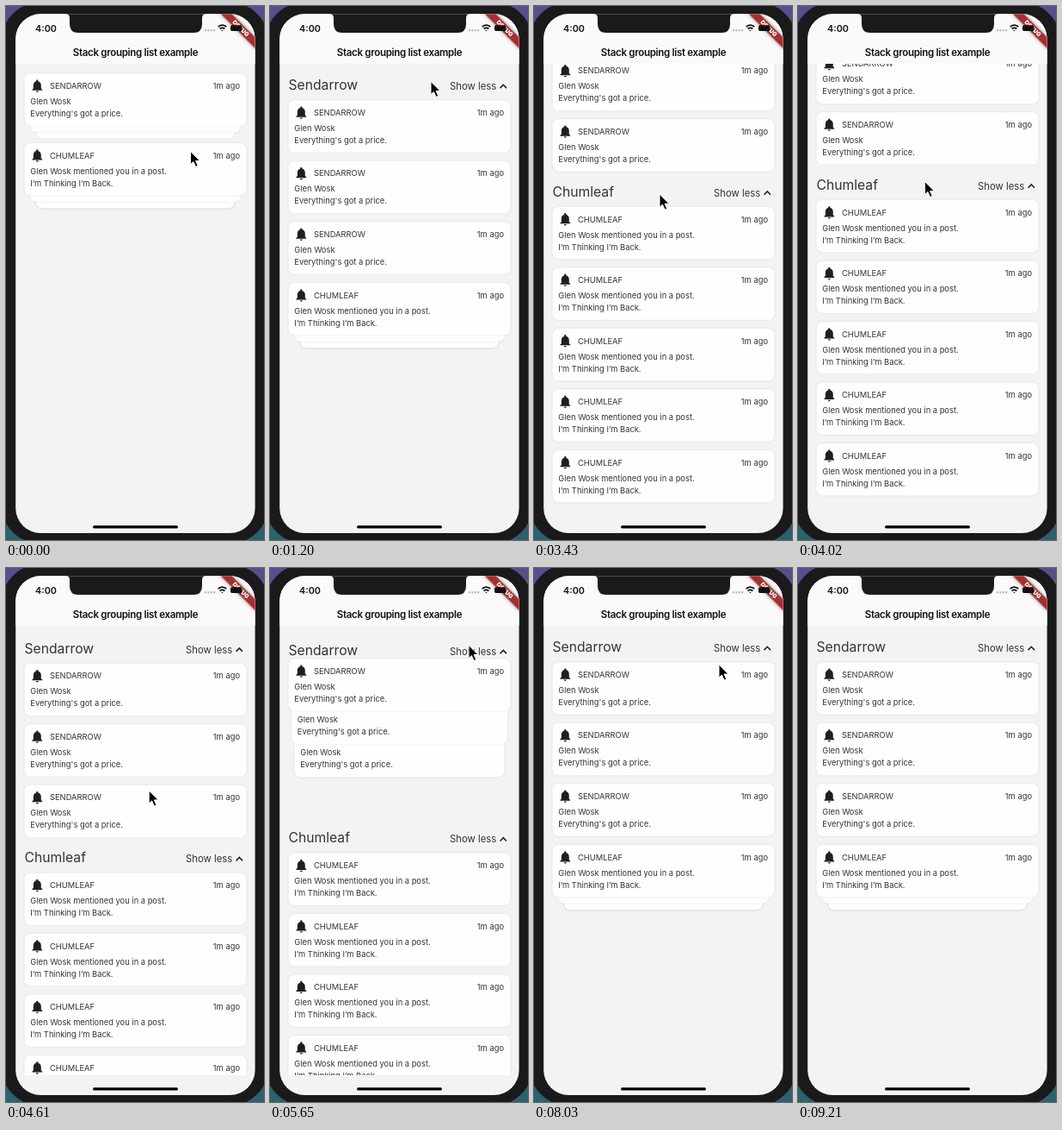
Write an HTML page that moves like this. It is 300 by 619 pixels and loops after 9.31 s.

```html
<!DOCTYPE html>
<html lang="en">
<head>
<meta charset="utf-8">
<title>Stack grouping list example</title>
<style>
  html, body { margin: 0; width: 100%; height: 100%; overflow: hidden; background: #1a1a1a; }
  svg { display: block; width: 100%; height: 100%; }
  text { font: 9.35px Inter, sans-serif; fill: #333; white-space: pre; }
  .heading { font-size: 15.7px; }
  .less { font-size: 11.3px; }
  .title { font-size: 11.5px; font-weight: 600; letter-spacing: -.3px; fill: #111; }
  .clock { font-size: 10.8px; font-weight: 600; fill: #111; }
  .debug { font-size: 6.8px; font-weight: 900; fill: #fff; }
  .end { text-anchor: end; }
  .mid { text-anchor: middle; }
  .card rect { fill: #fefefe; filter: drop-shadow(0 .7px .8px rgba(0, 0, 0, .1)); }
  .ribbon { fill: #a5302f; filter: drop-shadow(0 0 2px rgba(0, 0, 0, .4)); }
  .chevron { fill: none; stroke: #222; stroke-width: 1.6; }
</style>
</head>
<body>
<svg viewBox="0 0 300 619" preserveAspectRatio="none">
  <defs>
    <linearGradient id="desk" x2="0" y2="1">
      <stop stop-color="#5c4d8c"/><stop offset="1" stop-color="#2a626e"/>
    </linearGradient>
    <clipPath id="screen"><rect x="11.2" y="9.2" width="278.4" height="601.8" rx="29"/></clipPath>
    <clipPath id="viewport"><rect x="11" y="67" width="279" height="521"/></clipPath>
    <path id="bell" fill="#1f1f1f" transform="scale(.743)" d="M12 22c1.1 0 2-.9 2-2h-4c0 1.1.89 2 2 2zm6-6v-5c0-3.07-1.64-5.64-4.5-6.32V4c0-.83-.67-1.5-1.5-1.5s-1.5.67-1.5 1.5v.68C7.63 5.36 6 7.92 6 11v5l-2 2v1h16v-1l-2-2z"/>
  </defs>

  <rect width="300" height="619" fill="url(#desk)"/>
  <rect x="-5" y="-4" width="310" height="627" rx="44" fill="#1a1a1a"/>

  <g clip-path="url(#screen)">
    <rect width="300" height="619" fill="#f3f3f3"/>
    <rect width="300" height="67" fill="#fafafa"/>
    <g clip-path="url(#viewport)"><g id="list"></g></g>
    <text class="title mid" x="150.5" y="57.5">Stack grouping list example</text>
    <g transform="translate(290 9) rotate(45)">
      <rect class="ribbon" x="-29.7" y="19.6" width="59.4" height="8.9"/>
      <text class="debug mid" y="26.2">DEBUG</text>
    </g>
    <path fill="#1a1a1a" d="M69 8V9q5 0 5 5v7q0 10 10 10H218q10 0 10-10V14q0-5 5-5V8z"/>
    <text class="clock" x="34" y="29.8">4:00</text>
    <path d="M232 28.3h11" stroke="#bbb" stroke-width="2.4" stroke-linecap="round" stroke-dasharray="0 3.4"/>
    <g fill="none" stroke="#111" stroke-width="1.7">
      <path d="M246.7 24.2q4.8-4.2 9.6 0M248.6 26.5q2.9-2.4 5.8 0"/>
      <path d="M250.2 27.9h2.6l-1.3 1.4z" fill="#111" stroke="none"/>
    </g>
    <rect x="261" y="22.3" width="13.5" height="6.6" rx="1.7" fill="#111"/>
    <rect x="101" y="602.2" width="99" height="3.4" rx="1.7" fill="#000"/>
  </g>

  <path id="cursor" d="M0 0V15.2L3.4 12 6.1 18 8.7 16.8 6.1 11H11Z" fill="#000" stroke="#fff" stroke-width="1"/>
</svg>

<script>
const LOOP = 9310;
const TOP = 78.3, HEADER = 30.9, PITCH = 70.5, CARD = 60.5;
const LEFT = 21.5, WIDTH = 258, TUCK = 7.4, INSET = 6.8, FOLDED = 80.8;
const TOGGLE_STEPS = 1.35, SCROLL_RANGE = 127;

// Groups start folded; each tap flips them.
const groups = [
  { name: "Sendarrow", count: 3, taps: [5.6, 37.43, 51.6],
    lines: ["Glen Wosk", "Everything's got a price."] },
  { name: "Chumleaf", count: 5, taps: [13.6, 46.06],
    lines: ["Glen Wosk mentioned you in a post.", "I’m Thinking I’m Back."] }
];

const cursorStart = { x: 214.5, y: 168.5 };
const cursorMoves = [
  { x: 187, y: 87.5, from: 0, to: 2 },
  { x: 150, y: 345, from: 8, to: 12 },
  { x: 141.5, y: 262, from: 14, to: 18 },
  { x: 147.5, y: 203.5, from: 20, to: 24 },
  { x: 150, y: 300, from: 27, to: 29 },
  { x: 231, y: 89.5, from: 30, to: 35 },
  { x: 231, y: 112, from: 40, to: 44 },
  { x: 239.5, y: 168.5, from: 45, to: 46 },
  { x: 215, y: 112, from: 47, to: 50 },
  { x: 190, y: 640, from: 54, to: 59 }
];

const mix = (a, b, p) => a + (b - a) * p;
const ramp = (step, from, to) => Math.min(1, Math.max(0, (step - from) / (to - from)));
const moveTo = (node, x, y) => node.setAttribute("transform", `translate(${x} ${y})`);

function addGroup(parent, markup, className = "") {
  const g = document.createElementNS("http://www.w3.org/2000/svg", "g");
  g.setAttribute("class", className);
  g.innerHTML = markup;
  parent.append(g);
  return g;
}

const list = document.getElementById("list");
const cursor = document.getElementById("cursor");

for (const group of groups) {
  group.node = addGroup(list, "");
  group.header = addGroup(group.node, `
    <text class="heading" x="21.5" y="18.7">${group.name}</text>
    <text class="less" x="209" y="18.7">Show less</text>
    <path class="chevron" d="M267.6 16.8l3.7-3.8 3.7 3.8"/>`);
  // Later cards lie beneath earlier ones.
  group.cards = Array.from({ length: group.count }, () => addGroup(group.node, `
    <rect height="${CARD}" rx="7"/>
    <g><use href="#bell" transform="translate(27.4 5.4)"/>
      <text x="51" y="17.7">${group.name.toUpperCase()}</text>
      <text x="28.3" y="35.7">${group.lines[0]}</text>
      <text x="28.3" y="49.7">${group.lines[1]}</text></g>
    <text class="end" x="272" y="17.7">1m ago</text>`, "card")).reverse();
}

function foldAt(taps, step) {
  return taps.reduce((fold, tap, i) =>
    fold + (i % 2 ? 1 : -1) * ramp(step, tap, tap + TOGGLE_STEPS), 1);
}

// A swipe to the end, then a springy swipe back past the top.
function scrollAt(step) {
  const back = Math.max(0, step - 27);
  const down = 1 - (1 - ramp(step, 20, 24)) ** 2;
  return -SCROLL_RANGE * down * Math.exp(-back) * Math.cos(back);
}

function layoutGroup(group, top, step) {
  const fold = foldAt(group.taps, step);
  const stack = 1 - (1 - fold) ** 1.3;
  const shrink = fold ** 2.35;
  moveTo(group.node, 0, top);
  moveTo(group.header, 0, HEADER * shrink);
  group.cards.forEach((card, i) => {
    const depth = Math.min(i, 2);
    const inset = INSET * depth * stack;
    const [rect, content, age] = card.children;
    moveTo(card, 0, HEADER * (1 - shrink) + mix(PITCH * i, TUCK * depth, stack));
    rect.setAttribute("x", LEFT + inset);
    rect.setAttribute("width", WIDTH - 2 * inset);
    moveTo(content, inset, 0);
    moveTo(age, -inset, 0);
  });
  return top + mix(HEADER + PITCH * group.count + .3, FOLDED, shrink);
}

function cursorAt(step) {
  return cursorMoves.reduce((pos, move) => {
    const p = ramp(step, move.from, move.to);
    return { x: mix(pos.x, move.x, p), y: mix(pos.y, move.y, p) };
  }, cursorStart);
}

// The picture advances in steps of about 150 ms.
const stepAt = t => Math.floor(t < 1800 ? t / 150 : (t - 18) / 148.1);

function draw(t) {
  const step = stepAt(t);
  let top = TOP + scrollAt(step);
  for (const group of groups) top = layoutGroup(group, top, step);
  const { x, y } = cursorAt(step);
  moveTo(cursor, x, y);
}

const start = performance.now();
function tick() {
  draw((performance.now() - start) % LOOP);
  requestAnimationFrame(tick);
}
tick();
</script>
</body>
</html>
```
